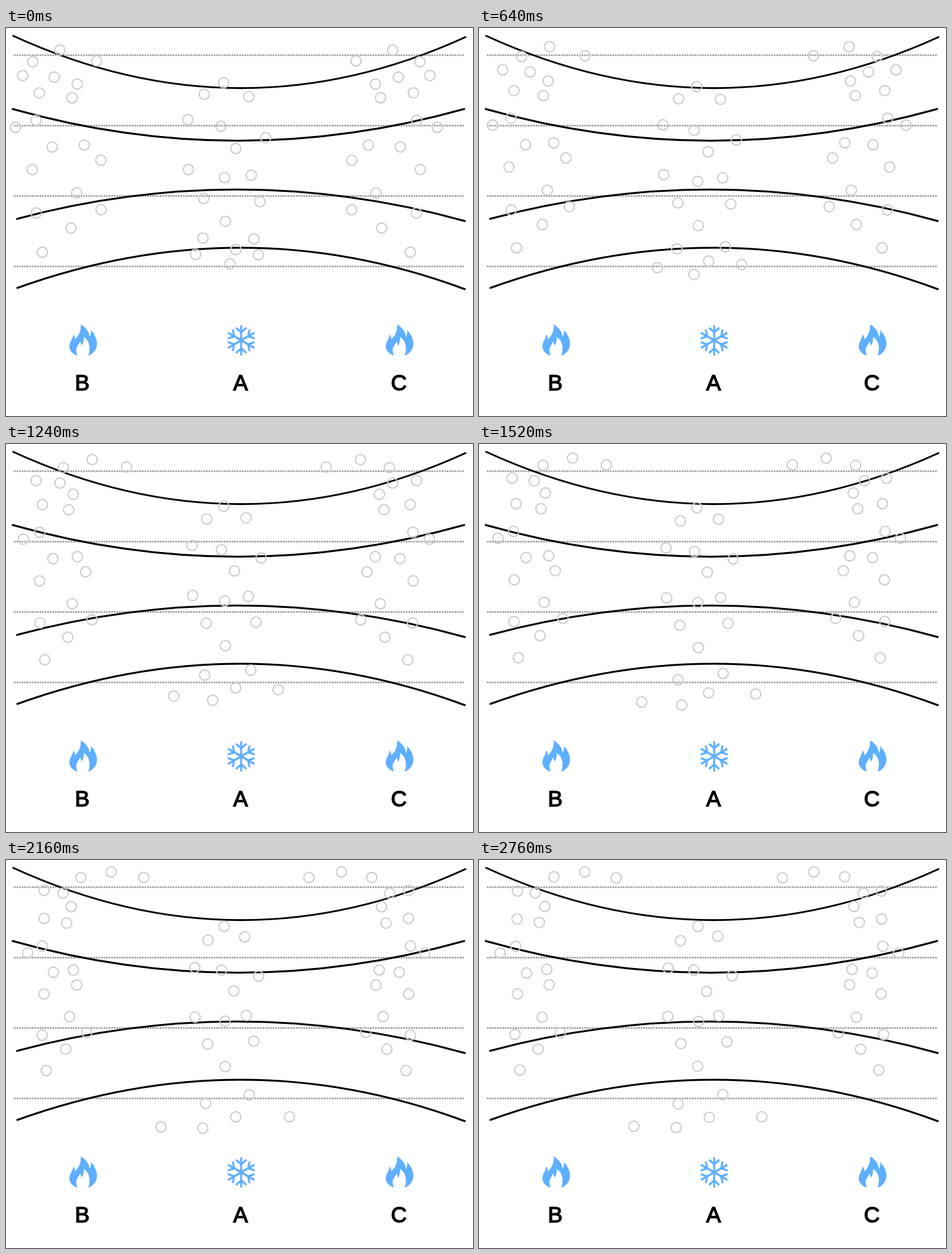
Recreate the animation shown at these times as an HTML page with a canvas. Size 744 px wide and 618 px high, loop 2800 ms.

```html
<!DOCTYPE html>
<html lang="en">
<head>
<meta charset="utf-8">
<title>Convection</title>
<style>
  html, body { margin: 0; width: 100%; height: 100%; overflow: hidden; background: #fff; }
  canvas { display: block; }
</style>
</head>
<body>
<canvas id="stage" width="744" height="618"></canvas>
<script>
const ctx = document.getElementById('stage').getContext('2d');
const LOOP = 2800, STEP = 40, TRAVEL = 1960;
const MIRROR = 702;
const BLUE = '#5eafff';

// Where each particle is halfway through its travel; the flow rules move it from there.
const warmPoints = [
  [126.5, 27], [182, 40], [81, 41], [43.5, 62], [84, 65.5], [108.5, 82], [57, 98],
  [101, 106], [52.5, 142], [25, 153], [116, 181], [74.5, 184], [132, 205], [51, 219.5],
  [107, 256], [53, 287], [140, 282], [99.5, 310], [61, 346.5]
];
const coldPoints = [
  [347, 96.5], [319, 116.5], [383.5, 116], [295, 158.5], [343, 166], [408, 180],
  [364.5, 200], [296, 238], [348.5, 247.5], [387, 241], [318, 282.5], [399.5, 282.5],
  [349.5, 318.5], [391, 355], [316, 361], [274.5, 393], [366, 381], [427, 385], [335, 401.5]
];

const bump = (v, center, width) => Math.exp(-(((v - center) / width) ** 2));
const logistic = v => 1 / (1 + Math.exp(-v));
const mix = (a, b, k) => a + (b - a) * k;

// Warm air gathers into a column, rises and spreads inward at the top.
function warmFlow(x, y) {
  const gather = (0.37 + 0.35 * bump(y, 210, 25)) * (78 - x);
  const rise = 10 + 12 * (y / 350) ** 4 + 20 * bump(y, 53, 24);
  return [mix(gather, 82, logistic((57 - y) / 6)), -rise];
}

// Cold air gathers, sinks and spreads to both sides at the bottom.
function coldFlow(x, y) {
  const gather = 0.2 * (350 - x);
  const spread = 56 * Math.tanh((x - 366) / 30);
  const sink = 18 + 0.13 * (350 - x) + 40 * bump(y, 382, 40);
  return [mix(gather, spread, logistic((y - 374) / 4)), sink];
}

// Steady travel, then a slight drift in a scattered direction.
function position([x, y], index, flow, time) {
  const [dx, dy] = flow(x, y);
  const k = Math.min(time / TRAVEL, 1) - 0.5;
  const drift = 1.5 * Math.max(time - TRAVEL, 0) / (LOOP - TRAVEL);
  const angle = index * 2.4;
  return [x + dx * k + drift * Math.cos(angle), y + dy * k + drift * Math.sin(angle)];
}

// Quadratic curves: start, control, end.
const isobars = [
  [11.5, 12.5, 373, 178, 732, 14.5],
  [10.5, 129, 369, 230, 730, 129],
  [17.5, 304, 374, 209, 731, 307.5],
  [18, 414, 378, 285, 731, 416]
];

const flame = new Path2D(
  'M119 472C127 477 133 484 133 492C135 489 136 485 135 481C141 487 145 495 145 503' +
  'C145 512 139 519 131 522C135 511 134 499 124 492C124 498 123 503 120 506' +
  'C120 503 119 501 118 499C117 504 112 507 112 513C112 516 113 519 114 522' +
  'C106 519 101 514 101 507C101 500 107 495 107 488C109 490 110 493 110 496' +
  'C116 490 120 482 119 472Z');
const snowArm = new Path2D('M0 0V-23M-7.3 -19.3L0 -12.8L7.3 -19.3');

function strokeStyle(color, width, dash = []) {
  ctx.strokeStyle = color;
  ctx.lineWidth = width;
  ctx.setLineDash(dash);
}

function drawLevels() {
  strokeStyle('#999', 3, [0, 4.08]);
  for (let i = 0; i < 4; i++) {
    const y = 43.2 + i * 112.2;
    ctx.beginPath();
    ctx.moveTo(14, y);
    ctx.lineTo(731.5, y);
    ctx.stroke();
  }
}

function drawIsobars() {
  strokeStyle('#000', 3);
  for (const [x, y, ...rest] of isobars) {
    ctx.beginPath();
    ctx.moveTo(x, y);
    ctx.quadraticCurveTo(...rest);
    ctx.stroke();
  }
}

function drawFlame(dx) {
  ctx.save();
  ctx.translate(dx, 0);
  ctx.fillStyle = BLUE;
  ctx.fill(flame);
  ctx.restore();
}

function drawSnowflake() {
  strokeStyle(BLUE, 3.2);
  ctx.save();
  ctx.translate(374.7, 497.5);
  for (let i = 0; i < 6; i++) {
    ctx.stroke(snowArm);
    ctx.rotate(Math.PI / 3);
  }
  ctx.restore();
}

function drawLabels() {
  ctx.fillStyle = '#000';
  strokeStyle('#000', 1.4);
  ctx.font = '35px "Liberation Sans", Arial, sans-serif';
  ctx.textAlign = 'center';
  ['B', 'A', 'C'].forEach((label, i) => {
    const x = 121.5 + i * 252.2;
    ctx.fillText(label, x, 577.4);
    ctx.strokeText(label, x, 577.4);
  });
}

function ring(x, y) {
  ctx.beginPath();
  ctx.arc(x, y, 8.2, 0, 2 * Math.PI);
  ctx.stroke();
}

function drawParticles(time) {
  strokeStyle('#ccc', 2);
  coldPoints.forEach((p, i) => ring(...position(p, i, coldFlow, time)));
  warmPoints.forEach((p, i) => {
    const [x, y] = position(p, i, warmFlow, time);
    ring(x, y);
    ring(MIRROR - x, y);
  });
}

function frame() {
  const time = Math.floor((performance.now() % LOOP) / STEP) * STEP;
  ctx.fillStyle = '#fff';
  ctx.fillRect(0, 0, 744, 618);
  ctx.lineCap = 'round';
  drawLevels();
  drawIsobars();
  drawFlame(0);
  drawFlame(504);
  drawSnowflake();
  drawLabels();
  drawParticles(time);
  requestAnimationFrame(frame);
}
frame();
</script>
</body>
</html>
```
